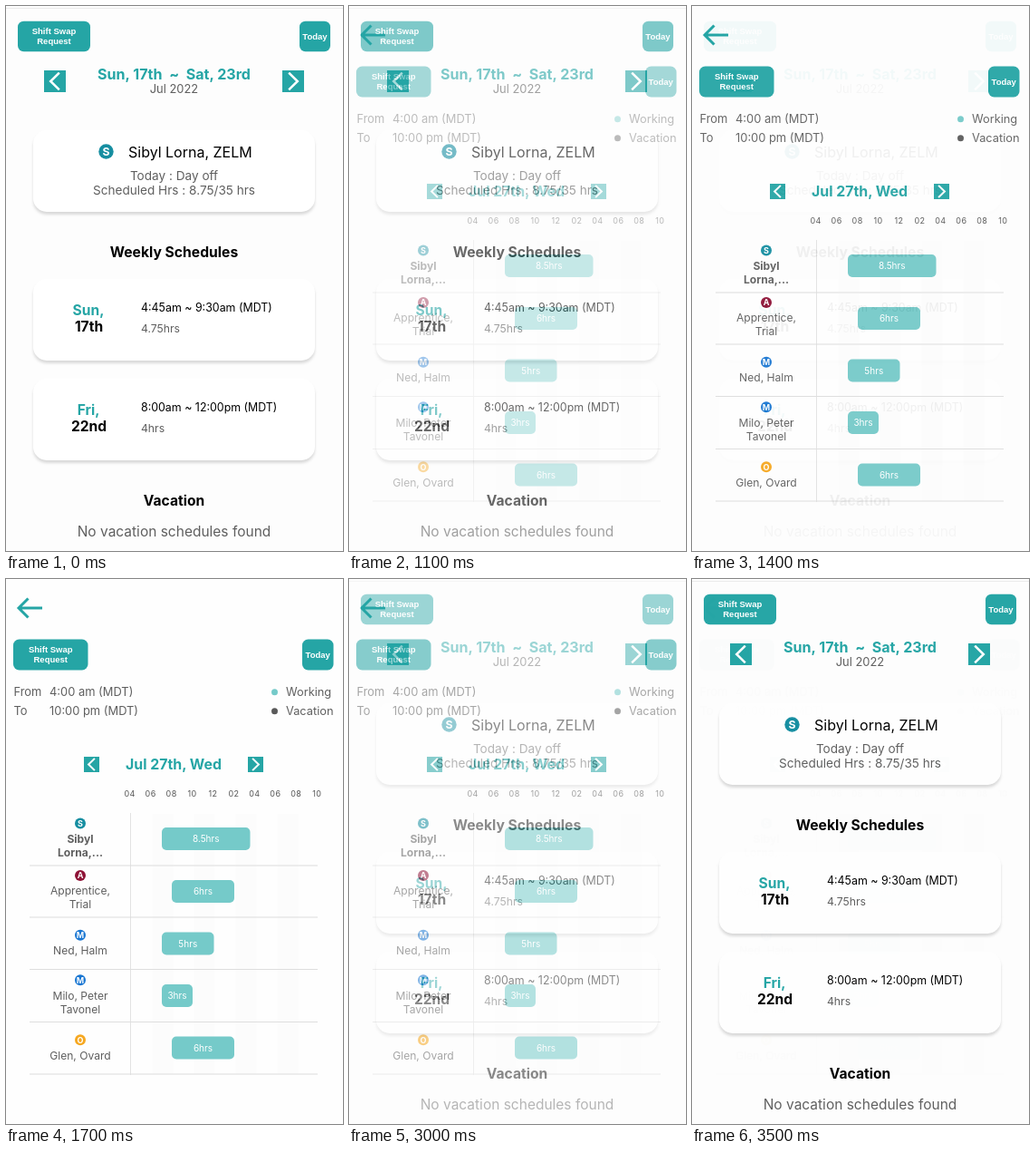
Write an HTML page that moves like this. It is 372 px wide and 601 px high and loops after 3.82 s.

```html
<!DOCTYPE html>
<html lang="en">
<head>
<meta charset="utf-8">
<title>Schedule views</title>
<style>
html, body { margin: 0; width: 100%; height: 100%; overflow: hidden; background: #fefefe; }
svg { display: block; width: 100vw; height: 100vh; font-family: Inter, "Open Sans", sans-serif; }
.btn { font: bold 9.5px "Liberation Sans", Arial, sans-serif; fill: #fff; }
.card { fill: #fff; filter: drop-shadow(0 3px 1.8px rgba(0, 0, 0, .14)); }
.bold { font-weight: 700; }
</style>
</head>
<body>
<svg id="stage" viewBox="0 0 372 601" preserveAspectRatio="none">
  <g id="day"></g>
  <g id="week"></g>
</svg>
<script>
const TEAL = '#25a5a5', GRAY = '#5f5f5f', BAR = '#75cac9';
const LOOP = 3820;
const NS = 'http://www.w3.org/2000/svg';
const day = document.getElementById('day');
const week = document.getElementById('week');

function add(parent, tag, attrs, content) {
  const el = document.createElementNS(NS, tag);
  for (const key in attrs) el.setAttribute(key, attrs[key]);
  if (content) el.textContent = content;
  parent.appendChild(el);
  return el;
}

function rect(g, x, y, w, h, fill, rx = 0) {
  return add(g, 'rect', { x, y, width: w, height: h, fill, rx });
}

function text(g, str, x, y, size, fill, opts = {}) {
  const el = add(g, 'text', {
    x, y, 'font-size': size, fill,
    'text-anchor': opts.left ? 'start' : 'middle',
    'letter-spacing': opts.spacing || 0
  }, str);
  el.style.whiteSpace = 'pre';
  if (opts.bold) el.setAttribute('class', 'bold');
}

function stroke(g, d, color, width) {
  add(g, 'path', { d, fill: 'none', stroke: color, 'stroke-width': width });
}

function button(g, x, y, w, h, lines, firstBase) {
  rect(g, x, y, w, h, TEAL, 6.5);
  lines.forEach((line, i) => add(g, 'text', {
    x: x + w / 2, y: firstBase + i * 11, class: 'btn', 'text-anchor': 'middle'
  }, line));
}

// dir is -1 for left, 1 for right
function chevron(g, x, y, size, dir, width) {
  const cx = x + size / 2, cy = y + size / 2;
  const reach = size * .2 * dir, rise = size * .39;
  rect(g, x, y, size, size, TEAL);
  stroke(g, `M${cx - reach} ${cy - rise}L${cx + reach} ${cy}L${cx - reach} ${cy + rise}`, '#fff', width);
}

function avatar(g, x, y, r, letter, color) {
  add(g, 'circle', { cx: x, cy: y, r, fill: color });
  text(g, letter, x, y + r * .55, r * 1.5, '#fff', { bold: true });
}

function buildWeek(g) {
  rect(g, 0, 0, 372, 601, '#fdfdfd');
  rect(g, 0, 2, 372, 1, '#ebebeb');
  button(g, 13, 16.7, 80, 33.5, ['Shift Swap', 'Request'], 31);
  button(g, 324, 16.7, 34, 33.5, ['Today'], 37);
  chevron(g, 42, 71, 24, -1, 2.5);
  chevron(g, 305, 71, 24, 1, 2.5);
  text(g, 'Sun, 17th  ~  Sat, 23rd', 185.5, 81, 16.1, TEAL, { bold: true });
  text(g, 'Jul 2022', 185.5, 96, 12.9, GRAY);

  for (const y of [137, 301, 411]) {
    add(g, 'rect', { class: 'card', x: 30, y, width: 311, height: 90, rx: 15 });
  }
  avatar(g, 110.5, 160.5, 8.2, 'S', '#168ea1');
  text(g, 'Sibyl Lorna, ZELM', 135, 167, 16, '#000', { left: true });
  text(g, 'Today : Day off', 185.5, 192, 13.6, GRAY);
  text(g, 'Scheduled Hrs : 8.75/35 hrs', 185.5, 208, 13.6, GRAY);

  text(g, 'Weekly Schedules', 185.5, 277, 15.7, '#000', { bold: true });
  const shifts = [
    [341, 'Sun,', '17th', '4:45am ~ 9:30am (MDT)', '4.75hrs'],
    [451, 'Fri,', '22nd', '8:00am ~ 12:00pm (MDT)', '4hrs']
  ];
  for (const [y, name, date, span, hours] of shifts) {
    text(g, name, 91, y, 15.6, TEAL, { bold: true });
    text(g, date, 91.5, y + 18, 15.6, '#000', { bold: true });
    text(g, span, 149, y - 4, 12.4, '#000', { left: true });
    text(g, hours, 149, y + 19, 12.2, GRAY, { left: true });
  }
  text(g, 'Vacation', 185.5, 551, 15.6, '#000', { bold: true });
  text(g, 'No vacation schedules found', 185.5, 585, 15.5, GRAY);
}

function buildDay(g) {
  rect(g, 0, 0, 372, 601, '#fefefe');
  stroke(g, 'M40 32H14M24.5 21.5L14 32L24.5 42.5', TEAL, 3);
  button(g, 8, 66.5, 82.5, 34, ['Shift Swap', 'Request'], 81);
  button(g, 327, 66.5, 34.5, 34, ['Today'], 87);

  const pairs = [
    [129, 'From', '4:00 am (MDT)', 'Working', BAR],
    [150, 'To', '10:00 pm (MDT)', 'Vacation', '#5a5a5a']
  ];
  for (const [y, label, time, kind, color] of pairs) {
    text(g, label, 8.5, y, 12.9, GRAY, { left: true });
    text(g, time, 48, y, 12.9, GRAY, { left: true });
    add(g, 'circle', { cx: 296.5, cy: y - 4.3, r: 3.5, fill: color });
    text(g, kind, 309, y, 12.8, GRAY, { left: true });
  }

  chevron(g, 86, 196, 17, -1, 2);
  chevron(g, 267, 196, 17, 1, 2);
  text(g, 'Jul 27th, Wed', 185, 210, 15.9, TEAL, { bold: true });

  for (let i = 0; i < 10; i++) {
    const hour = (3 + i * 2) % 12 + 1;
    text(g, String(hour).padStart(2, '0'), 136.7 + i * 22.95, 240, 9, '#555', { spacing: .4 });
  }
  for (let i = 0; i < 4; i++) rect(g, 161.5 + i * 46, 259, 23, 287, '#fcfcfc');
  rect(g, 137, 258, 1, 289, '#e2e2e2');
  for (const y of [315.5, 372.5, 430, 488, 545.5]) rect(g, 26, y, 318, 1, '#dedede');

  const rows = [
    // avatar y, letter, color, name lines, bar x, bar width, bar y, hours
    [269.5, 'S', '#168ea1', ['Sibyl', 'Lorna,...'], 172, 97.5, 274, '8.5hrs'],
    [327, 'A', '#8e1236', ['Apprentice,', 'Trial'], 183, 69, 332, '6hrs'],
    [392.7, 'M', '#1976d2', ['Ned, Halm'], 172, 57.5, 389.5, '5hrs'],
    [442.3, 'M', '#1976d2', ['Milo, Peter', 'Tavonel'], 172, 34, 447, '3hrs'],
    [508.3, 'O', '#f6a821', ['Glen, Ovard'], 183, 69, 504.5, '6hrs']
  ];
  rows.forEach(([y, letter, color, lines, x, w, top, hours], n) => {
    avatar(g, 82, y, 6, letter, color);
    lines.forEach((line, i) =>
      text(g, line, 82, Math.round(y + 21.3) + i * 15.3, 12.1, GRAY, { bold: n === 0 }));
    rect(g, x, top, w, 25, BAR, 5);
    text(g, hours, x + w / 2, top + 16.3, 10, '#fff');
  });
}

// Opacity of the outgoing view, held for 100 ms per step
function fade(t, start, first, drop, rest, end) {
  if (t < start) return 1;
  if (t >= end) return 0;
  return Math.max(first - drop * Math.floor((t - start) / 100), rest);
}

function draw(t) {
  const weekLevel = t < 2900
    ? fade(t, 1000, .77, .18, .012, 1700)
    : 1 - fade(t, 2900, .74, .19, .012, LOOP);
  week.setAttribute('opacity', weekLevel);
}

buildDay(day);
buildWeek(week);
const began = performance.now();
function tick() {
  draw((performance.now() - began) % LOOP);
  requestAnimationFrame(tick);
}
tick();
</script>
</body>
</html>
```
